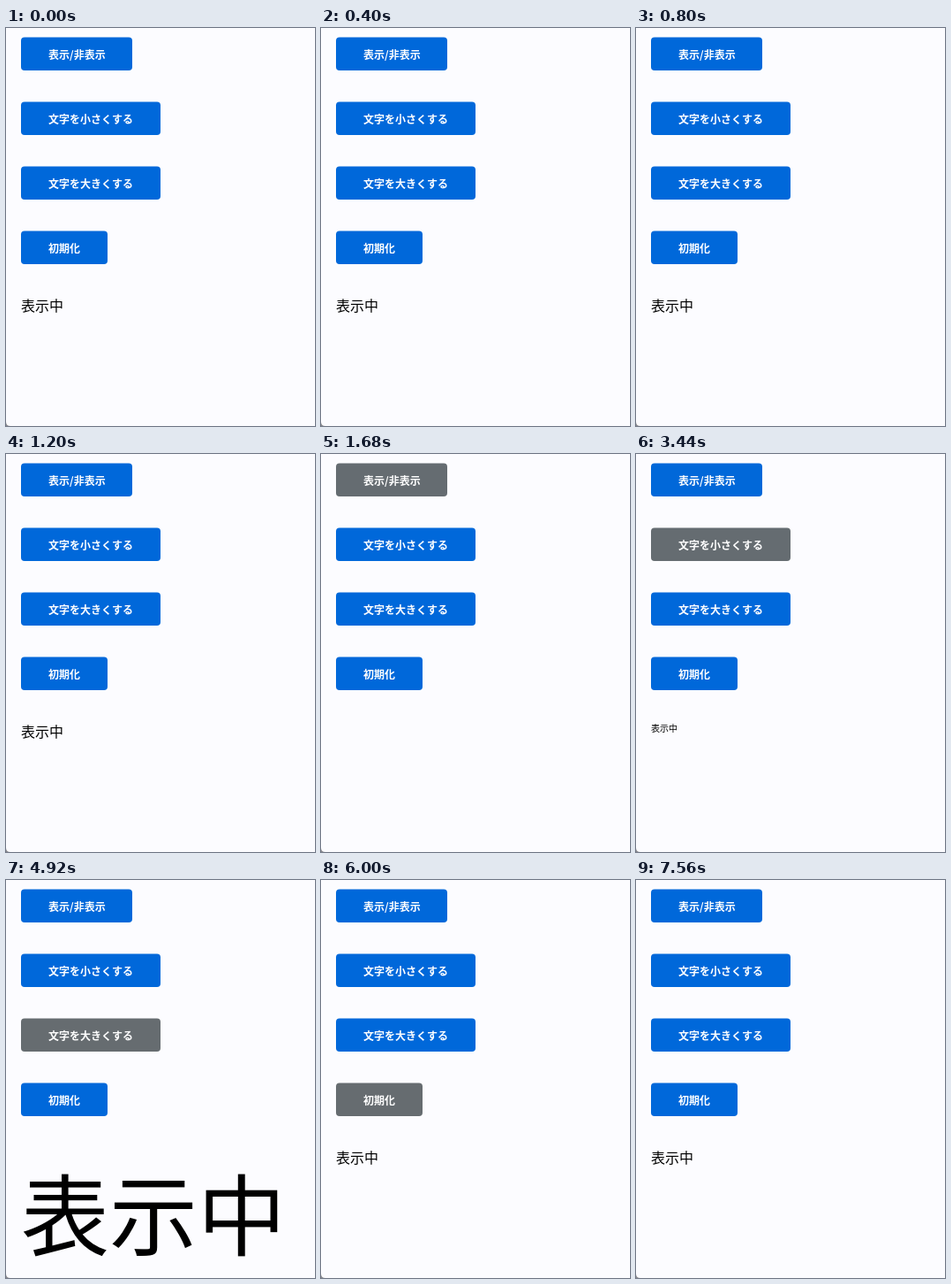
Recreate the animation shown at these times as an HTML page. Size 350x450 px, loop 7600 ms.

```html
<!DOCTYPE html>
<html lang="ja">
<head>
<meta charset="utf-8">
<style>
html, body { margin: 0; width: 100%; height: 100%; overflow: hidden; background: #fcfcff; }
svg { display: block; }
text { font-family: "Noto Sans CJK JP", "Noto Sans CJK", "Noto Sans", sans-serif; }
.label { font-size: 12px; font-weight: 700; fill: #fff; }
.status { font-weight: 350; fill: #000; }
</style>
</head>
<body>
<svg id="stage" width="350" height="450" viewBox="0 0 350 450">
  <path d="M0 445Q0 450 5 450H0Z" fill="#8a8a8e"/>
</svg>
<script>
const LOOP = 7600, FADE = 150;
const BLUE = [0, 104, 218], GREY = [102, 108, 112];

// label, top, width, time turned grey, time turned back
const BUTTONS = [
  ['表示/非表示', 10.6, 126, 1540, 3300],
  ['文字を小さくする', 83.6, 158, 3300, 4700],
  ['文字を大きくする', 156.6, 158, 4700, 5840],
  ['初期化', 229.6, 98, 5840, 7100]
];

// start time, font size (0 = hidden)
const SIZES = [[0, 16], [1600, 0], [2680, 16], [3320, 10], [4720, 100], [5840, 16]];

const stage = document.getElementById('stage');

function add(tag, attrs, content = '') {
  const el = document.createElementNS('http://www.w3.org/2000/svg', tag);
  for (const name in attrs) el.setAttribute(name, attrs[name]);
  el.textContent = content;
  return stage.appendChild(el);
}

const rects = BUTTONS.map(([label, y, width]) => {
  const rect = add('rect', { x: 17, y, width, height: 37.4, rx: 4 });
  add('text', { x: 48, y: y + 24.4, class: 'label' }, label);
  return rect;
});
const status = add('text', { x: 17, class: 'status' }, '表示中');

function ease(t, start) {
  const p = Math.min(1, Math.max(0, (t - start) / FADE));
  return p * p * (3 - 2 * p);
}

function render(t) {
  BUTTONS.forEach(([, , , on, off], i) => {
    const k = ease(t, on) - ease(t, off);
    const rgb = BLUE.map((c, j) => Math.round(c + (GREY[j] - c) * k));
    rects[i].setAttribute('fill', `rgb(${rgb})`);
  });
  const size = SIZES.filter(([start]) => start <= t).pop()[1];
  status.setAttribute('visibility', size ? 'visible' : 'hidden');
  if (size) {
    status.setAttribute('font-size', size);
    status.setAttribute('y', 302 + size * 1.15);
  }
}

const begin = performance.now();
function tick() {
  render((performance.now() - begin) % LOOP);
  requestAnimationFrame(tick);
}
tick();
</script>
</body>
</html>
```
